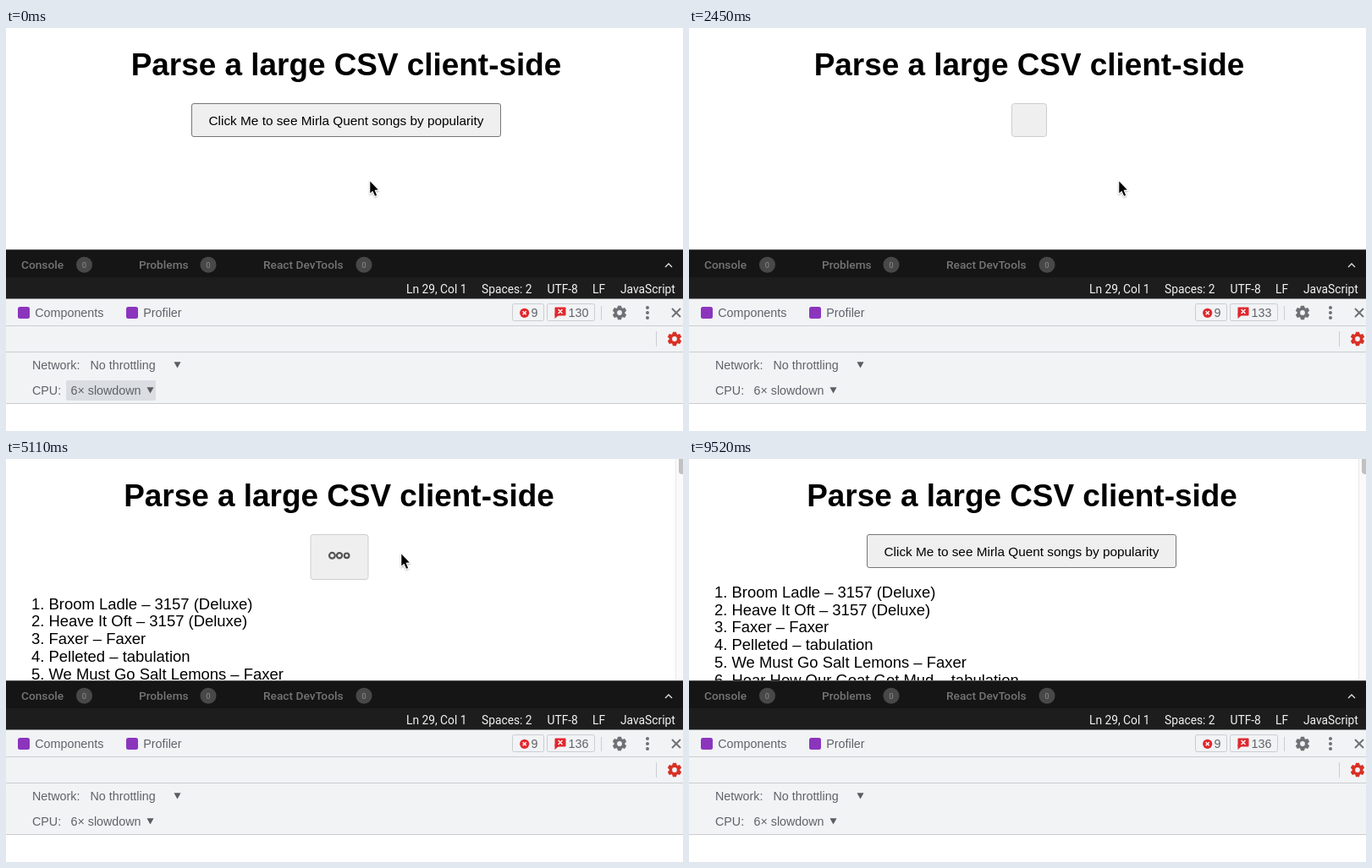
Write an HTML page with a canvas that moves like this. It is 800x477 px and loops after 9.59 s.

```html
<!DOCTYPE html>
<html lang="en">
<head>
<meta charset="utf-8">
<title>Parse a large CSV client-side</title>
<style>
  html, body { margin: 0; width: 100%; height: 100%; overflow: hidden; background: #fff; }
  canvas { display: block; }
</style>
</head>
<body>
<canvas id="stage" width="800" height="477"></canvas>
<script>
const ctx = document.getElementById('stage').getContext('2d');
const LOOP = 9590, STEP = 70;
const SANS = '"Liberation Sans", Arial, sans-serif';
const ROBOTO = 'Roboto, sans-serif';
const UI = '14.3px ' + SANS;
const GREY = '#5f6368', RED = '#e0282e', PANEL = '#f1f3f5';

const LABEL = 'Click Me to see Mirla Quent songs by popularity';
const SONGS = [
  'Broom Ladle – 3157 (Deluxe)',
  'Heave It Oft – 3157 (Deluxe)',
  'Faxer – Faxer',
  'Pelleted – tabulation',
  'We Must Go Salt Lemons – Faxer',
  'Hear How Our Goat Got Mud – tabulation',
];

const smooth = p => p * p * (3 - 2 * p);
const linear = p => p;
const easeIn = p => Math.pow(p, 1.4);

// Pointer path: time, x, y, easing towards this point
const PATH = [
  [0, 430, 181, linear], [910, 430, 181, linear], [1330, 430, 115, smooth],
  [1890, 430, 115, linear], [2450, 508, 181, smooth], [3850, 508, 181, linear],
  [4410, 467, 112, smooth], [7140, 467, 112, linear], [7630, 578, 73, easeIn],
  [7980, 655, -24, linear], [LOOP, 655, -24, linear],
];

function pointerAt(t) {
  const i = PATH.findIndex(k => k[0] > t);
  const [t0, x0, y0] = PATH[i - 1], [t1, x1, y1, ease] = PATH[i];
  const p = ease((t - t0) / (t1 - t0));
  return { x: x0 + (x1 - x0) * p, y: y0 + (y1 - y0) * p };
}

function stateAt(t) {
  const mode = t >= 1960 && t < 2660 ? 'empty'
    : (t >= 2660 && t < 3430) || (t >= 4620 && t < 5460) ? 'busy' : 'ready';
  return {
    mode,
    listed: t >= 3430,
    focused: t < 1820,
    issues: t < 1960 ? 130 : t < 4620 ? 133 : 136,
  };
}

function rect(x, y, w, h, color) {
  ctx.fillStyle = color;
  ctx.fillRect(x, y, w, h);
}

function box(x, y, w, h, r, fill, stroke) {
  ctx.beginPath();
  ctx.roundRect(x, y, w, h, r);
  if (fill) { ctx.fillStyle = fill; ctx.fill(); }
  if (stroke) { ctx.strokeStyle = stroke; ctx.lineWidth = 1; ctx.stroke(); }
}

function text(str, x, y, font, color, align = 'left') {
  ctx.font = font;
  ctx.fillStyle = color;
  ctx.textAlign = align;
  ctx.fillText(str, x, y);
}

function dot(x, y, r, color) {
  ctx.fillStyle = color;
  ctx.beginPath();
  ctx.arc(x, y, r, 0, Math.PI * 2);
  ctx.fill();
}

function line(color, width, ...pts) {
  ctx.strokeStyle = color;
  ctx.lineWidth = width;
  ctx.beginPath();
  for (let i = 0; i < pts.length; i += 2) ctx.lineTo(pts[i], pts[i + 1]);
  ctx.stroke();
}

function shape(color, ...pts) {
  ctx.fillStyle = color;
  ctx.beginPath();
  for (let i = 0; i < pts.length; i += 2) ctx.lineTo(pts[i], pts[i + 1]);
  ctx.closePath();
  ctx.fill();
}

function cross(x, y, r, color, width) {
  line(color, width, x - r, y - r, x + r, y + r);
  line(color, width, x - r, y + r, x + r, y - r);
}

function gear(x, y, color) {
  ctx.save();
  ctx.translate(x, y);
  dot(0, 0, 6.2, color);
  for (let i = 0; i < 6; i++) {
    shape(color, -2.9, -5, -2, -8.3, 2, -8.3, 2.9, -5);
    ctx.rotate(Math.PI / 3);
  }
  dot(0, 0, 2.9, PANEL);
  ctx.restore();
}

function arrowDown(x, y) {
  shape('#5a5d61', x - 4, y - 3.8, x + 4, y - 3.8, x, y + 3.6);
}

function drawLoader(cx, t) {
  for (let i = 0; i < 3; i++) {
    const r = 3.1 + 0.4 * Math.sin((t - 5110) / 160 - (i - 1) * 0.8);
    ctx.strokeStyle = '#555';
    ctx.lineWidth = 2.2;
    ctx.beginPath();
    ctx.arc(cx + (i - 1) * 8.6, 114.3, r, 0, Math.PI * 2);
    ctx.stroke();
  }
}

function drawPage(t, s, ptr) {
  const cx = s.listed ? 393.5 : 402;
  text('Parse a large CSV client-side', cx, 55.5, 'bold 36.9px ' + SANS, '#000', 'center');

  if (s.mode === 'ready') {
    const hover = Math.abs(ptr.x - cx) < 183 && ptr.y > 89 && ptr.y < 129;
    const left = Math.floor(cx) - 182.5;
    box(left, 89.5, 365, 39, 2.5, hover ? '#e5e5e5' : '#efefef', hover ? '#4f4f4f' : '#767676');
    text(LABEL, left + 182.5, 114.5, '15.35px ' + SANS, '#000', 'center');
  } else if (s.mode === 'empty') {
    box(cx - 20.5, 89.5, 41, 39, 3, '#efefef', '#cdcdcd');
  } else {
    box(cx - 33.5, 89.5, 68, 53, 3, '#efefef', '#cdcdcd');
    drawLoader(cx + 0.5, t);
  }

  if (s.listed) {
    const top = s.mode === 'busy' ? 177.7 : 164;
    SONGS.forEach((song, i) =>
      text(`${i + 1}. ${song}`, 30, top + i * 20.7, '18.45px ' + SANS, '#000'));
    rect(791, 0, 9, 263, '#fafafa');
    rect(791, 0, 1, 263, '#e8e8e8');
    box(795, -8, 9, 26, 4, '#c1c1c1');
  }
}

function drawEditorBars() {
  rect(0, 262, 800, 1, '#5a5a5a');
  rect(0, 263, 800, 33, '#151515');
  rect(0, 295, 800, 25, '#1d1d1d');
  for (const [label, x, badge] of [['Console', 18, 92.5], ['Problems', 157, 239], ['React DevTools', 304, 423]]) {
    text(label, x, 285, '500 13.7px ' + ROBOTO, '#757575');
    dot(badge, 280.3, 9.5, '#484848');
    text('0', badge, 283.6, '9.5px ' + ROBOTO, '#8d8d8d', 'center');
  }
  line('#ddd', 1.4, 779, 283, 783, 279, 787, 283);
  for (const [label, x] of [['Ln 29, Col 1', 473], ['Spaces: 2', 562], ['UTF-8', 639.5], ['LF', 693], ['JavaScript', 726]])
    text(label, x, 314, '13.8px ' + ROBOTO, '#f2f2f2');
}

function drawDevTools(s) {
  rect(0, 320, 800, 1, '#8a8a8a');
  rect(0, 321, 800, 123, PANEL);
  for (const y of [352, 383, 444]) rect(0, y, 800, 1, '#cacdd1');

  for (const [label, x] of [['Components', 14], ['Profiler', 142]]) {
    box(x, 330, 14, 14, 2.5, '#8b35bd');
    text(label, x + 20.3, 341.8, UI, GREY);
  }

  box(598.5, 326.5, 37, 20, 2, null, '#cacdd1');
  dot(612.7, 337.3, 5.6, RED);
  cross(612.7, 337.3, 2, '#fff', 1.4);
  text('9', 620.5, 341.8, UI, GREY);

  box(639.5, 326.5, 56, 20, 2, null, '#cacdd1');
  box(648.5, 330.5, 13, 10, 1, RED);
  shape(RED, 648.5, 338, 648.5, 344, 653, 340);
  cross(655, 335.5, 2.4, '#fff', 1.4);
  text(s.issues, 664.5, 341.8, UI, GREY);

  rect(703, 329, 1, 17, '#cacdd1');
  gear(725, 337, '#6e7175');
  for (const y of [331, 337, 343]) dot(758, y, 2, '#6e7175');
  cross(792, 337, 5, '#6e7175', 1.9);

  rect(768, 359, 1, 18, '#cacdd1');
  gear(790, 368, '#d93025');

  text('Network:', 31, 404, UI, GREY);
  text('No throttling', 99.5, 404, UI, GREY);
  arrowDown(202.5, 399);
  if (s.focused) box(71, 417, 106, 24, 2, '#dadde2');
  text('CPU:', 31, 434, UI, GREY);
  text('6× slowdown', 76.5, 434, UI, GREY);
  arrowDown(170.5, 429);
}

function drawPointer({ x, y }) {
  ctx.save();
  ctx.translate(x, y);
  ctx.shadowColor = 'rgba(0,0,0,.3)';
  ctx.shadowBlur = 2;
  ctx.shadowOffsetY = 1;
  shape('#fff', -0.8, -1.6, -0.8, 16.8, 3, 13.6, 5.6, 19.2, 9.4, 17.6, 6.9, 12, 11.9, 11.8);
  ctx.shadowColor = 'transparent';
  shape('#000', 0.3, 0.6, 0.3, 14.5, 3.4, 11.7, 6.1, 17.7, 8.1, 16.9, 5.5, 10.8, 9.8, 10.6);
  ctx.restore();
}

function draw(now) {
  const t = Math.floor((now % LOOP) / STEP) * STEP;
  const s = stateAt(t), ptr = pointerAt(t);
  rect(0, 0, 800, 477, '#fff');
  drawPage(t, s, ptr);
  drawEditorBars();
  drawDevTools(s);
  drawPointer(ptr);
}

const start = performance.now();
function tick() {
  draw(performance.now() - start);
  requestAnimationFrame(tick);
}
tick();
</script>
</body>
</html>
```
